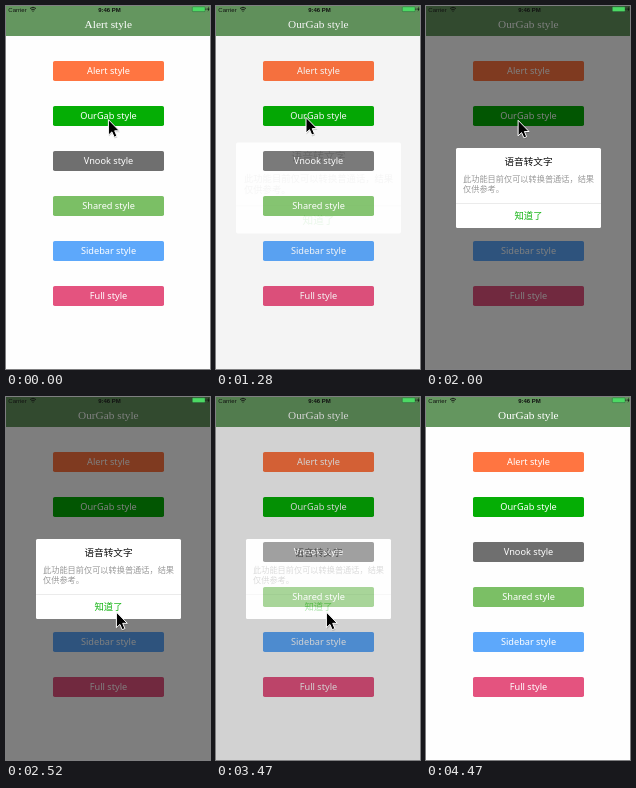
An HTML page for the animation above (6340 ms loop, 204x363 px).

```html
<!DOCTYPE html>
<html lang="zh-Hans">
<head>
<meta charset="utf-8">
<title>Alert style</title>
<style>
  html, body { margin: 0; width: 100%; height: 100%; overflow: hidden; background: #fefefe; }
  svg { display: block; width: 204px; height: 363px; }
  text { text-anchor: middle; }
  .title { font: 11.3px "Liberation Serif", serif; fill: #fff; }
  .button { font: 9.2px "Noto Sans", sans-serif; fill: #fff; }
  .status { font: 6px "Liberation Sans", sans-serif; fill: #111; }
  .popup { font-family: "Noto Sans CJK SC", "Noto Sans CJK", sans-serif; }
  .body { font-size: 8.2px; fill: #999; text-anchor: start; }
</style>
</head>
<body>
<svg viewBox="0 0 204 363">
  <rect width="204" height="363" fill="#fefefe"/>
  <rect width="204" height="30" fill="#64965f"/>
  <text id="title" class="title" x="102.3" y="22.3"></text>
  <g id="buttons"></g>

  <g id="popup" class="popup">
    <rect x="-40" y="-40" width="284" height="443" fill="#000" fill-opacity=".5"/>
    <rect x="30" y="142" width="145" height="80" rx="1.5" fill="#fff"/>
    <text x="102.5" y="158.7" font-size="9.6" font-weight="500" fill="#111">语音转文字</text>
    <text class="body" x="37" y="176.4">此功能目前仅可以转换普通话，结果</text>
    <text class="body" x="37" y="186.4">仅供参考。</text>
    <path d="M30 197.5h145" stroke="#e3e3e3" stroke-width=".7"/>
    <text x="102.5" y="213.4" font-size="9.4" fill="#14b414">知道了</text>
  </g>

  <g class="status">
    <text x="11.5" y="5.6">Carrier</text>
    <g fill="none" stroke="#111" stroke-width=".9">
      <path d="M24 2.5q3-2.6 6 0M25.2 3.9q1.8-1.6 3.6 0"/>
    </g>
    <circle cx="27" cy="5.1" r=".7"/>
    <text x="103.5" y="5.6" font-weight="bold">9:46 PM</text>
    <rect x="186.3" y=".8" width="12.8" height="4.8" rx=".8" fill="#4cd964" stroke="#253" stroke-width=".4"/>
    <path d="M199.6 2.4h.7v1.6h-.7z"/>
    <path d="M203 .6l-2 2.9h1.2l-.5 2.2 2-2.9h-1.2z"/>
  </g>

  <g id="cursor">
    <path d="M.9 1.6V17.4L4.3 14.1 6.5 19.4 9.5 18.2 7.3 13H12z" fill="#000" opacity=".18"/>
    <path d="M.4.4V16L3.9 12.7 6.2 18 8.9 16.9 6.7 11.6H11.3z" fill="#000" stroke="#fff" stroke-width="1" stroke-linejoin="round"/>
  </g>
</svg>
<script>
const LOOP = 6340;
const el = id => document.getElementById(id);
const [title, popup, cursor] = ['title', 'popup', 'cursor'].map(el);

const buttons = [
  ['Alert', '#ff7541'], ['OurGab', '#05ae05'], ['Vnook', '#6f6f6f'],
  ['Shared', '#7bbf65'], ['Sidebar', '#5da8fb'], ['Full', '#e4537f']
];
el('buttons').innerHTML = buttons.map(([name, color], i) => {
  const y = 55 + 45 * i;
  return `<rect x="47" y="${y}" width="111" height="20" rx="1.8" fill="${color}"/>
    <text class="button" x="102.5" y="${y + 12.9}">${name} style</text>`;
}).join('');

// Number of steps taken, spread evenly from the first to the last time.
function stepAt(t, first, last, count) {
  if (t < first) return 0;
  return Math.min(count, 1 + Math.floor((t - first) / (last - first) * (count - 1) + 1e-6));
}
const smooth = k => k * k * (3 - 2 * k);
const mix = (a, b, k) => a + (b - a) * k;
const bezier = (a, b, c, d, k) => {
  const m = 1 - k;
  return a * m * m * m + 3 * b * m * m * k + 3 * c * m * k * k + d * k * k * k;
};

const fadeIn = [0, .08, .36, .7, .93, 1];
const fadeOut = [1, .97, .86, .62, .34, .1, 0];

function cursorAt(t) {
  if (t < 2000) {
    return [
      mix(102, 89.6, smooth(stepAt(t, 50, 220, 4) / 4)),
      mix(113.2, 111, stepAt(t, 520, 630, 2) / 2)
    ];
  }
  if (t < 4190) {
    const k = smooth(stepAt(t, 2000, 2520, 10) / 10);
    return [bezier(89.6, 115, 135, 110, k), mix(111, 214.7, k)];
  }
  const k = (stepAt(t, 4190, 4470, 6) / 6) ** 1.5;
  return [mix(110, 188, k), mix(214.7, 372, k)];
}

function draw(t) {
  title.textContent = buttons[t < 1110 ? 0 : 1][0] + ' style';

  const opening = t < 3290;
  const shown = opening ? fadeIn[stepAt(t, 1280, 1520, 5)] : fadeOut[stepAt(t, 3290, 3590, 6)];
  const scale = opening ? mix(1.15, 1, shown) : 1;
  popup.setAttribute('opacity', shown);
  popup.setAttribute('transform', `translate(102.5 182) scale(${scale}) translate(-102.5 -182)`);

  cursor.setAttribute('transform', `translate(${cursorAt(t)})`);
}

const start = performance.now();
function tick() {
  draw((performance.now() - start) % LOOP);
  requestAnimationFrame(tick);
}
tick();
</script>
</body>
</html>
```
